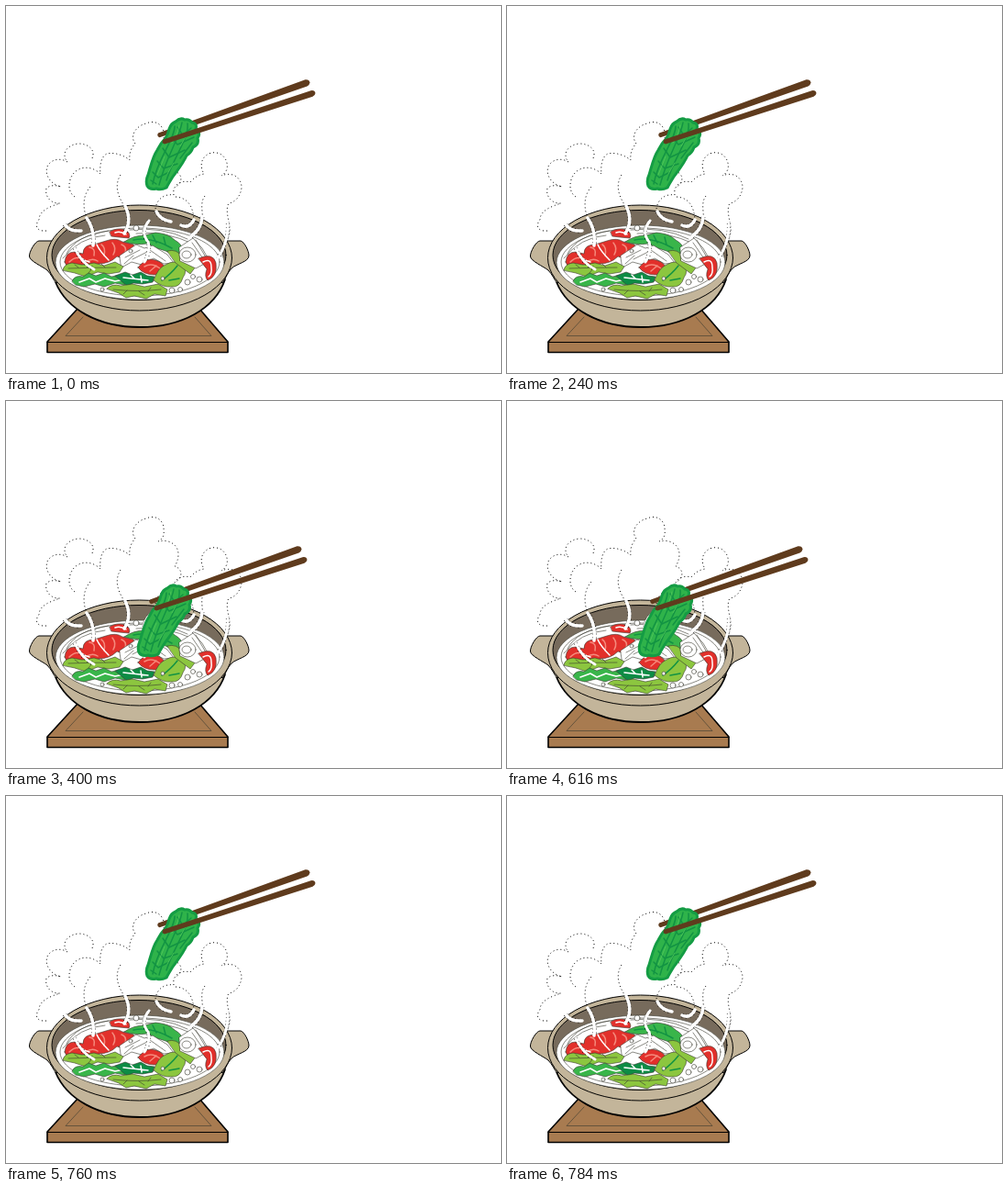
Recreate the animation shown at these times as an HTML page. Size 540 by 400 pixels, loop 0.8 s.

```html
<!DOCTYPE html>
<html lang="en">
<head>
<meta charset="utf-8">
<title>Hot pot</title>
<style>
  html, body { margin: 0; width: 100%; height: 100%; overflow: hidden; background: #fff; }
  svg { display: block; width: 540px; height: 400px; }
  path, ellipse, circle, line { stroke-linecap: round; stroke-linejoin: round; }
  .ink { stroke: #000; stroke-width: 1; }
  .thin { stroke: #3a3a30; stroke-width: .6; }
  .none { fill: none; }
  .clay { fill: #c3b59a; }
  .wood { fill: #a87b50; }
  .wall { fill: #776b5c; }
  .white { fill: #fff; }
  .red { fill: #e2302b; }
  .lime { fill: #8cc63f; }
  .green { fill: #39b54a; }
  .deep { fill: #0d8c45; }
  .pink { fill: none; stroke: #f58a7c; stroke-width: 1.5; }
  .vein { fill: none; stroke: #129343; stroke-width: 1.5; }
  .pale { fill: none; stroke: #fff; stroke-width: 1.5; }
  .stick { fill: #5f3b1d; }
  .cloud { fill: none; stroke: #000; stroke-width: 1; stroke-dasharray: 1 3; stroke-linecap: butt; }
</style>
</head>
<body>
<svg viewBox="0 0 540 400">
  <g id="stand">
    <path class="wood" stroke="#000" stroke-width="1.6" d="M78 330L45 366V377.500H242V366L211 330Z"/>
    <path class="none ink" d="M45 366.500H242"/>
    <path class="none thin" d="M84 339L65 359.500H224L206 339"/>
  </g>

  <g id="pot">
    <path class="clay" stroke="#000" stroke-width="1.8" d="M54 301C66 330 100 350 146 350C192 350 228 330 239 298Z"/>
    <path class="clay ink" d="M50 256H36C32 256 25 268 25.500 273C26 278 40 284 45 288C50 293 51 298 55 302L70 290Z"/>
    <path class="clay ink" d="M240 256H256C260 257 265 267 265 272C265 279 251 281 246 286C241 291 240 297 236 302L222 290Z"/>
    <ellipse class="clay ink" cx="145.500" cy="274.500" rx="101" ry="57.500"/>
    <ellipse class="wall ink" cx="145" cy="271.500" rx="95" ry="49"/>
    <ellipse class="white thin" cx="146" cy="279.500" rx="92" ry="40.500"/>
    <ellipse class="none thin" cx="146" cy="279" rx="87" ry="37"/>
  </g>

  <g id="food">
    <path class="none thin" d="M62 275Q80 252 108 250M66 270Q76 250 112 245M135 244Q170 240 198 254M142 248Q172 244 206 260"/>
    <path class="red thin" d="M113 246Q121 241 130 244Q137 248 134 253Q122 252 115 251Z"/>
    <path class="pale" d="M119 247Q125 245 131 249"/>
    <path class="red thin" d="M64 279Q65 268 75 268L84 270Q84 260 96 260L109 256Q120 252 127 257L139 260Q143 267 136 271Q128 276 121 273Q113 281 101 281Q91 287 78 285Q67 288 64 279Z"/>
    <path class="pink" d="M69 279Q77 271 84 277M91 263Q98 264 96 272M104 260Q109 263 107 272M116 258Q121 264 117 271M126 260Q132 262 130 269M87 279Q94 274 100 278"/>
    <path class="pale" d="M79 270Q82 277 91 279M99 260Q102 267 112 277"/>

    <path class="green thin" d="M129 257Q139 250 151 250L163 247Q177 248 184 255Q195 261 192 270Q184 272 174 267Q163 264 154 259Q141 261 129 257Z"/>
    <path class="vein" d="M139 255Q158 251 181 264M160 250L164 258M172 252L174 260"/>
    <path class="white thin" d="M124 272L142 260L151 264L160 261L176 271L183 280L172 281L161 275L148 282L137 279L126 285Z"/>
    <path class="none thin" d="M130 274L146 266M138 276L154 268M157 266L174 278M129 281L139 272"/>
    <path class="red thin" d="M144 285Q150 277 158 276Q169 277 174 285Q172 292 162 293Q150 293 144 285Z"/>
    <path class="pink" d="M151 284Q159 279 168 286M157 289L164 283"/>

    <path class="lime thin" d="M62 288Q63 281 72 280L83 282L96 280L107 283L119 279L128 284L124 290L112 292L100 290L87 295L75 291Z"/>
    <path class="none thin" d="M68 286Q94 285 120 285M79 285L75 282M94 286L90 291M108 285L104 281"/>
    <path class="green thin" d="M72 300Q75 293 84 295L90 291L98 294L107 291L115 295L126 293L136 299L129 304L119 302L107 306L97 303L85 306L76 304Z"/>
    <path class="pale" d="M80 301L91 297L98 301L108 297L119 300L129 298"/>
    <path class="deep thin" d="M119 294L130 290L138 293L147 290L154 294L162 295L160 301L149 303L139 302L132 305L126 300Z"/>
    <path class="pale" d="M128 296L155 299M136 293L140 297M147 294L148 301"/>

    <path class="lime thin" d="M161 299Q166 285 174 282Q184 276 191 282Q199 288 193 296Q190 307 180 306Q171 307 161 299Z"/>
    <path class="vein" d="M170 299Q180 292 187 283M178 299L189 297"/>
    <path class="lime thin" d="M110 308Q116 302 125 305L138 303L151 306L166 303L176 309L174 316L162 314L153 319L140 316L131 318L123 313Z"/>
    <path class="none thin" d="M117 309Q144 312 169 309M132 310L128 314M145 311L151 315M155 311L158 307"/>
    <path class="lime thin" d="M176 267Q187 264 192 274L207 284L201 292L185 280Z"/>

    <path class="white thin" d="M189 263L204 253L214 264L222 278L207 286L190 278Z"/>
    <ellipse class="white thin" cx="198" cy="271" rx="9" ry="8"/>
    <ellipse class="none thin" cx="197" cy="271" rx="5" ry="4"/>
    <path class="none thin" d="M203 258L214 274M207 255L218 274"/>
    <path class="red thin" d="M210 275Q226 268 229 280Q231 295 220 299Q216 295 219 287Z"/>
    <path class="pale" d="M215 279Q224 274 224 285Q225 292 221 295"/>
    <g id="bubbles" class="white thin"></g>
  </g>

  <g id="steam">
    <path class="cloud" d="M44 245C33 246 31 239 36 233C36 224 46 219 59 215C49 216 42 207 44 199C47 195 55 195 60 197C48 194 42 184 45 175C49 167 59 165 67 170C59 160 68 151 79 150C90 150 98 157 94 166"/>
    <path class="cloud" d="M75 208C66 202 68 188 75 181C84 173 96 176 103 183C102 173 104 164 110 161C119 159 129 163 135 168C134 160 137 154 141 150C134 141 143 130 153 128C164 123 173 131 172 141C173 147 170 151 166 153C178 150 188 157 188 167C188 173 186 177 184 180C193 183 193 193 185 197"/>
    <path class="cloud" d="M163 225C162 213 171 204 183 206C181 196 190 189 201 192C205 187 210 184 216 183C210 173 214 163 224 160C236 158 243 168 241 178C238 184 236 184 235 185C247 180 257 187 257 198C256 207 250 214 243 215C239 222 243 232 244 242C245 252 238 261 233 271"/>
    <path class="cloud" d="M92 197C83 207 84 221 88 231M125 184C117 197 123 210 132 222M185 208C199 209 204 219 205 233M217 207C210 216 217 229 213 236"/>
  </g>

  <g id="lift">
    <path class="stick" d="M166 138.500L326.500 80.200Q331 79.800 331.500 83.500Q331 86.500 328.500 87.500L167.500 143.200Q164 142 166 138.500Z"/>
    <path fill="#2fb34a" stroke="#149c44" stroke-width="3" d="M185 126Q190 121 195 124Q200 123 203 127Q209 128 207 134Q213 138 209 144Q211 151 204 154Q202 160 197 163C193 172 187 179 182 186Q177 194 175 198Q169 201 164 199Q157 201 154 196Q152 190 155 184C158 174 160 164 165 157Q169 149 174 144Q177 139 178 134Q180 128 185 126Z"/>
    <g class="vein">
      <path d="M192 127C189 145 176 161 167 195M198 128C200 144 184 162 175 190M184 131C184 146 165 166 160 194"/>
      <path d="M187 132L193 141L202 133M180 143L187 151L205 143M171 155L178 165L195 157M165 169L172 177L187 172M160 181L166 187L178 181M203 149L190 166M158 190L164 194"/>
    </g>
    <path fill="none" stroke="#55c95c" stroke-width=".8" d="M189 130Q187 141 181 149M173 164L165 184M198 139L190 153M183 171L176 183"/>
    <path class="stick" d="M171.500 145.500L332.500 92.200Q337 91.500 337.500 95Q337 98 334.500 98.800L173 150.600Q169 149.500 171.500 145.500Z"/>
  </g>
</svg>
<script>
  const NS = 'http://www.w3.org/2000/svg';
  const add = (parent, tag, attrs) => {
    const el = document.createElementNS(NS, tag);
    for (const key in attrs) el.setAttribute(key, attrs[key]);
    parent.appendChild(el);
  };

  const bubbles = document.getElementById('bubbles');
  [[142, 242, 3], [136, 267, 2], [181, 310, 3], [190, 309, 2.5], [198, 301, 3],
   [204, 295, 2.5], [105, 309, 2], [211, 298, 3], [171, 297, 2]]
    .forEach(([cx, cy, r]) => add(bubbles, 'circle', { cx, cy, r }));

  // A dotted edge shows on both sides of a narrower white line.
  const steam = document.getElementById('steam');
  const wisp = (d, width) => {
    const line = { d, fill: 'none' };
    add(steam, 'path', { ...line, stroke: '#000', 'stroke-width': width + 1.2,
      'stroke-dasharray': '1 3', style: 'stroke-linecap:butt' });
    add(steam, 'path', { ...line, stroke: '#fff', 'stroke-width': width });
  };
  wisp('M64 238Q69 246 82 245', 3.5);
  wisp('M88 231Q97 244 95 261', 3.5);
  wisp('M75 264Q82 280 96 287', 3);
  wisp('M130 218Q138 234 129 248', 3.5);
  wisp('M156 234Q146 247 155 257Q158 267 151 279', 3);
  wisp('M164 224Q168 233 180 235', 3.5);
  wisp('M191 239Q200 243 205 233', 3.5);
  wisp('M214 230Q213 243 202 251', 3.5);
  wisp('M242 237Q243 256 231 275', 3);

  const up = 'translate(0px, 0px)', down = 'translate(-9px, 78px)';
  const steps = [[0, up], [400, down], [760, up], [800, up]];
  document.getElementById('lift').animate(
    steps.map(([ms, transform]) => ({ offset: ms / 800, transform, easing: 'steps(1, end)' })),
    { duration: 800, iterations: Infinity }
  );
</script>
</body>
</html>
```
